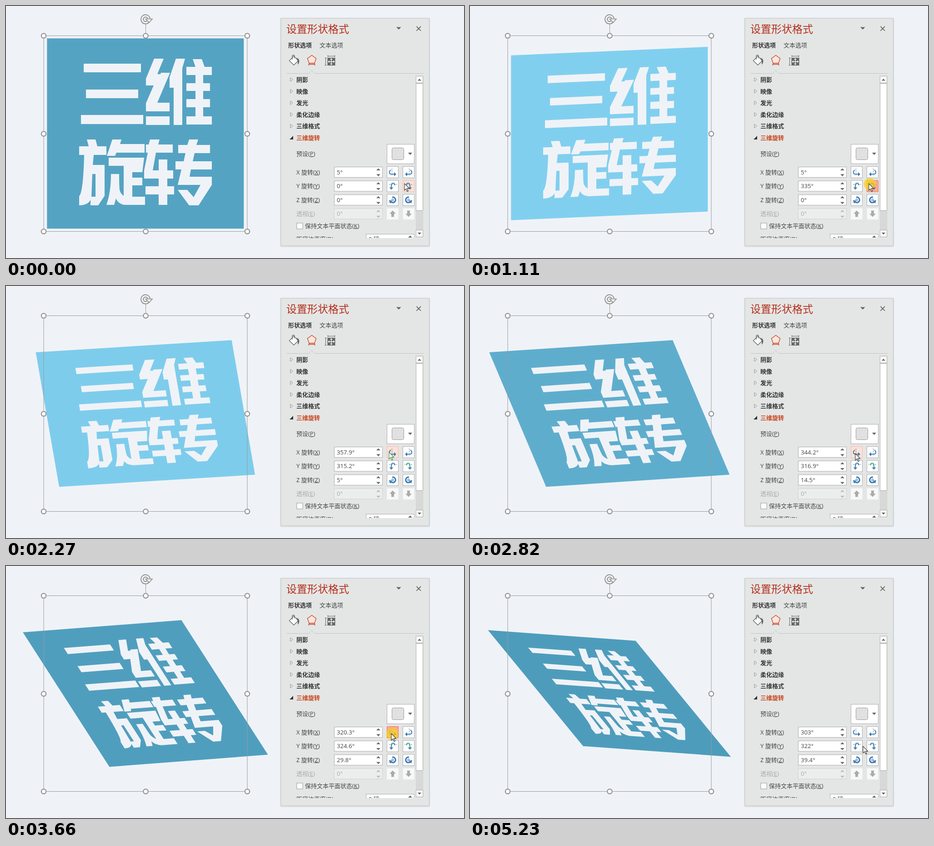
Recreate the animation shown at these times as an HTML page. Size 1008 by 555 pixels, loop 5380 ms.

```html
<!DOCTYPE html>
<html lang="zh-CN">
<head>
<meta charset="utf-8">
<title>三维旋转</title>
<style>
  html, body { margin: 0; width: 100%; height: 100%; overflow: hidden; background: #eff3f7; }
  svg { display: block; width: 100vw; height: 100vh; }
  text { font: 13px "Open Sans", "Noto Sans CJK SC", "Noto Sans CJK", sans-serif; fill: #444; }
  .title { font-size: 23px; fill: #b5301d; }
  .bold { font-weight: 700; fill: #333; }
  .hot { fill: #c8451f; }
  .off { fill: #a9aaaa; }
  .value { font-size: 13.2px; }
  .key { text-decoration: underline; }
  .box { fill: #fff; stroke: #ababab; }
  .tri { fill: #666; }
  .frame { fill: none; stroke: #999; }
  .knob { fill: #fff; stroke: #949494; stroke-width: 2.2; }
  .btn.hover { fill: #fde1d7; stroke: #f2bba8; }
  .btn.down { fill: #ffaa90; stroke: #e5755a; }
  .icon { fill: none; stroke: #3a7db5; stroke-width: 2; }
  .icon .axis { stroke: #777; stroke-width: 1; stroke-dasharray: 3 2; }
  .icon .head { fill: #3a7db5; stroke: none; }
</style>
</head>
<body>
<svg viewBox="0 0 1008 555" preserveAspectRatio="none">
  <defs>
    <clipPath id="list"><rect x="606" y="150" width="296" height="361"/></clipPath>
    <filter id="shade" x="-5%" y="-5%" width="110%" height="110%">
      <feDropShadow dx="0" dy="1" stdDeviation="1.5" flood-color="#000" flood-opacity=".2"/>
    </filter>
    <g id="turnX">
      <path class="axis" d="M-1.500-8V8"/>
      <path d="M-4-5C-9-1-8 5-1 4.500H4"/><path class="head" d="M3 0L8 4.500L3 9Z"/>
    </g>
    <g id="turnY">
      <path class="axis" d="M-8-3.500H9"/>
      <path class="arc" d="M5-2C4-8-3-8-3-1V4"/><path class="head" d="M-7.500 3H1.500L-3 8Z"/>
    </g>
    <g id="turnZ">
      <path d="M-1-6A6 6 0 1 1-4 4" stroke-width="3"/><path class="head" d="M-8 0L-1 2L-6 8Z"/>
      <circle cx="0" cy="0" r="2" stroke-width="1.200"/>
    </g>
  </defs>

  <g id="card" role="img" aria-label="三维旋转">
    <rect id="face" x="90.300" y="71.300" width="433" height="419"/>
    <g fill="#eff3f7">
      <path d="M171 127H297V146H171ZM176 184H291V203H176ZM165 240H302V260H165Z"/>
      <path d="M326 116H347L333 150H340L341 147H361L333 213H360V232H308V214L325 175H308V160ZM308 243H360V262H308Z
        M374 116H394L388 137V262H369V180H360V157ZM397 134H417L411 117H431L437 134H453V152H434V170H449V187H434V205H449V223H434V243H453V261H397V243H417V223H397V205H417V187H397V170H417V152H397Z"/>
      <path d="M178 294H197L201 309H221V328H193L191 350H217V418L203 439H186V420H197V370H190L188 420Q185 439 161 439V419Q170 410 172 328H161V309H182Z
        M234 294H254L251 304H305V323H243L240 330H222Z
        M226 334H304L300 366H278V378H300V395H278V420H306V438H262Q248 437 242 424L238 438H221Q231 410 231 370H249Q249 395 250 405Q253 415 259 418V352H226Z"/>
      <path d="M317 294H338L335 305H367V323H330L323 362H336V338H355V362H368V380H355V397H370V415H355V438H336V415H307V397H336V380H304V362L312 323H308V305H314Z
        M403 294H423L419 306H449V324H415L411 342H453V360H407L404 376H453V394L424 439H403L378 405H399L413 421L428 394H378L386 360H373V342H391L395 324H379V306H399Z"/>
    </g>
  </g>

  <path class="frame" d="M83 65.500H531V496.500H83ZM307.500 39V62"/>
  <g id="knobs"></g>
  <g fill="none">
    <path d="M312.500 34.500A7.500 7.500 0 1 1 314.500 28" stroke="#8f8f8f" stroke-width="7"/>
    <path d="M312.500 34.500A7.500 7.500 0 1 1 314.500 28" stroke="#f4f5f6" stroke-width="3.200"/>
    <path d="M307.500 28.500H322L315 36.500Z" fill="#f4f5f6" stroke="#8f8f8f" stroke-width="1.600"/>
  </g>

  <rect x="605" y="27" width="326.500" height="501" fill="#e4e6e5" stroke="#c2c4c5" filter="url(#shade)"/>
  <text class="title" x="617" y="58.500">设置形状格式</text>
  <path class="tri" d="M859 46.500H869.500L864.200 52Z"/>
  <path d="M903.500 45L913 54.500M913 45L903.500 54.500" stroke="#555" stroke-width="1.600"/>
  <text class="bold" x="621" y="90.500">形状选项</text>
  <text x="690" y="90.500">文本选项</text>

  <g fill="none" stroke="#666" stroke-width="1.300">
    <path d="M623.500 120.500L633.500 110.500L643.500 120.500L633.500 130Z" fill="#fafafa"/>
    <path d="M630 118V109.500Q632.500 107 635 109.500V115"/>
    <path d="M639 114Q646 116 645.500 122Q645 127 642 129Q643 122 639 114Z" fill="#666" stroke="none"/>
    <path d="M673 108.500L682.500 115.500L679 126H667L663.500 115.500Z" fill="#f8e5de" stroke="#c8451f" stroke-width="1.300"/>
    <path d="M667 126.500L666 131M679 126.500L680 131M666 128.500H680" stroke="#c8451f"/>
    <rect x="707.500" y="114" width="17" height="17" fill="#666" stroke="none"/>
    <path d="M716 116.500V128.500M710 122.500H722M714 118L716 116L718 118M714 127L716 129L718 127M711.500 120.500L709.500 122.500L711.500 124.500M720.500 120.500L722.500 122.500L720.500 124.500" stroke="#fff"/>
    <path d="M708 110.500H724M708.500 108V113M723.500 108V113M703.500 114V130M701.500 114.500H706M701.500 130.500H706" stroke-width="1"/>
  </g>
  <path d="M617 148.500H667L673 141.500L679 148.500H919" fill="none" stroke="#c3c5c7"/>

  <g id="panel" clip-path="url(#list)"></g>

  <rect x="902" y="154" width="16.500" height="355" fill="#d7d9d8"/>
  <path class="box" d="M902.500 154.500H917.500V169.500H902.500ZM902.500 170.500H917.500V450.500H902.500ZM902.500 493.500H917.500V508.500H902.500Z"/>
  <path class="tri" d="M906 164.500L910 160L914 164.500ZM906 499L910 503.500L914 499Z"/>

  <circle id="spot" r="13" fill="#f6d21c" opacity=".72"/>
  <path id="cursor" d="M0 0V15L3.500 11.700L6 17.500L8.300 16.500L5.800 10.900H10.600Z" fill="#fff" stroke="#333" stroke-width="1.100"/>
</svg>

<script>
const $ = id => document.getElementById(id);
const LOOP = 5380, RAD = Math.PI / 180, CX = 306.8, CY = 280.8;

// Static parts
const label = (name, key, y, cls = '') =>
  `<text class="${cls}" x="639" y="${y}">${name}(<tspan class="key">${key}</tspan>)</text>`;
const field = (x, y, off) =>
  `<rect class="box" x="${x + .5}" y="${y - 11.5}" width="106" height="23"
    ${off ? 'style="fill:#eceded;stroke:#d0d1d1"' : ''}/>
  <path class="tri" ${off ? 'style="fill:#bbb"' : ''}
    d="M${x + 93} ${y - 4}l4.500-4.500l4.500 4.500ZM${x + 93} ${y + 4.5}l4.500 4.500l4.500-4.500Z"/>`;

const heads = ['阴影', '映像', '发光', '柔化边缘', '三维格式', '三维旋转'].map((name, i) => {
  const y = 162 + i * 25.6, open = i === 5;
  const mark = open
    ? `<path d="M624 ${y + 4}H632V${y - 4}Z" fill="#333"/>`
    : `<path d="M626 ${y - 4}L631 ${y}L626 ${y + 4}Z" fill="#f4f4f4" stroke="#888"/>`;
  return mark + `<text class="bold ${open ? 'hot' : ''}" x="639" y="${y + 5}">${name}</text>`;
});

const rows = ['X', 'Y', 'Z'].map((axis, i) => {
  const y = 366 + i * 30.6;
  const buttons = [838, 873].map((x, side) =>
    `<rect class="box btn" x="${x + .5}" y="${y - 12.5}" width="25" height="25"/>
    <g class="icon" id="icon${axis}${side}" transform="translate(${x + 13} ${y}) scale(${side ? -1 : 1} 1)">
      ${$('turn' + axis).innerHTML}</g>`);
  return label(axis + ' 旋转', axis, y + 4.5) + field(722, y) +
    `<text class="value" id="val${axis}" x="728" y="${y + 4.5}"></text>` + buttons.join('');
});

$('panel').innerHTML = heads.join('') + label('预设', 'P', 330) +
  `<rect class="box" x="838.500" y="304.500" width="60" height="43"/>
  <rect x="849.500" y="312.500" width="26" height="26" rx="3" fill="#e1e1e1" stroke="#999"/>
  <path class="tri" d="M885 323H894L889.500 328Z"/>` +
  rows.join('') +
  label('透视', 'E', 462, 'off') + field(722, 457.5, true) +
  `<text class="value off" x="728" y="462">0°</text>
  <path d="M838.500 445.500H863.500V470H838.500ZM873.500 445.500H898.500V470H873.500Z" fill="#f8f8f8"/>
  <path d="M851 450.500L858 457.500H854V464.500H848V457.500H844ZM886 464.500L893 457.500H889V450.500H883V457.500H879Z" fill="#aaa"/>
  <rect x="640" y="478" width="13" height="13" fill="#fff" stroke="#999"/>
  <text x="658" y="488.500">保持文本平面状态(<tspan class="key">K</tspan>)</text>` +
  label('距底边高度', 'D', 518) + field(792, 514) + '<text x="798" y="518">0 磅</text>';

$('knobs').innerHTML = [83, 307.5, 531].flatMap(x => [65.5, 281.5, 496.5].map(y =>
  x === 307.5 && y === 281.5 ? '' : `<circle class="knob" cx="${x}" cy="${y}" r="5.200"/>`)).join('');

// Screen refresh times: start, end, count
const ticks = [0];
[[90, 620, 8], [710, 1180, 7], [1280, 1350, 2], [1500, 1960, 7], [2060, 2580, 8], [2650, 3120, 7],
 [3190, 3660, 7], [3740, 4270, 8], [4340, 4580, 4], [4750, 4820, 2], [5010, 5230, 4]]
  .forEach(([a, b, n]) => { for (let i = 0; i < n; i++) ticks.push(a + (b - a) * i / (n - 1)); });

// Each entry turns the card by five degrees
const tilt = [240, 390, 540, 710, 870, 1020, 1180, 1350, 1500];
const swing = [2060, 2200, 2430, 2650, 2810, 3040, 3350, 3500, 3740];
const tilt2 = [4580, 4750];
const presses = [160, 320, 470, 620, 790, 950, 1100, 1280, 1960, 2130, 2350, 2580, 2730,
  2960, 3270, 3420, 3660, 4420];
const path = [[0, 877, 391], [1500, 878, 391], [1960, 844, 366], [2290, 843, 366], [2350, 848, 369],
  [3740, 848, 369], [4270, 880, 394], [4950, 880, 394], [5230, 865, 397]];
const light = [[0, 66], [10, 41], [30, 0], [45, -7]];

const SLACK = 15;
const turned = (list, t) => 5 * list.filter(s => s <= t + SLACK).length;

function along(keys, t, k = 1) {
  const i = keys.findIndex(p => p[0] > t);
  if (i < 0) return keys[keys.length - 1][k];
  if (!i) return keys[0][k];
  const a = keys[i - 1], b = keys[i];
  return a[k] + (b[k] - a[k]) * (t - a[0]) / (b[0] - a[0]);
}

const rotX = ([x, y, z], d) => {
  const c = Math.cos(d * RAD), s = Math.sin(d * RAD);
  return [x, y * c - z * s, y * s + z * c];
};
const rotY = ([x, y, z], d) => {
  const c = Math.cos(d * RAD), s = Math.sin(d * RAD);
  return [x * c + z * s, y, z * c - x * s];
};

// Right and down axes of the card
function axes(a, b, c) {
  return [[Math.cos(5 * RAD), 0, Math.sin(5 * RAD)], [0, 1, 0]]
    .map(p => rotX(rotY(rotX(p, a), b), c));
}

function angleText(rad) {
  const d = +(((rad / RAD) % 360 + 360) % 360).toFixed(1);
  return d % 360 + '°';
}

const buttons = [...document.querySelectorAll('.btn')].map(el => ({
  el, x: +el.getAttribute('x'), y: +el.getAttribute('y')
}));

function draw(time) {
  const t = ticks.filter(s => s <= time + SLACK).pop();

  const a = turned(tilt, t), b = turned(swing, t), c = turned(tilt2, t);
  const [u, v] = axes(a, b, c), w = Math.cos(5 * RAD);
  $('card').setAttribute('transform',
    `translate(${CX} ${CY}) matrix(${u[0] / w} ${u[1] / w} ${v[0]} ${v[1]} 0 0) translate(${-CX} ${-CY})`);
  const glow = b ? along(light, b) : a * 1.46;
  $('face').setAttribute('fill', `rgb(${[85, 163, 195].map(n => Math.min(255, Math.round(n + glow)))})`);

  // The numbers trail behind the card
  const [p, q] = axes(turned(tilt, t - 200), turned(swing, t - 200), turned(tilt2, t - 70));
  $('valX').textContent = angleText(Math.atan2(p[2], p[0] * q[1] - p[1] * q[0]));
  $('valY').textContent = angleText(-Math.asin(q[2]));
  $('valZ').textContent = angleText(Math.atan2(q[0], q[1]));

  const x = along(path, t), y = along(path, t, 2);
  const down = presses.some(s => t >= s - SLACK && t < s + 55);
  $('cursor').setAttribute('transform', `translate(${x} ${y})`);
  $('cursor').setAttribute('stroke', t >= 1500 && t < 2330 ? '#2f8a45' : '#333');
  $('spot').setAttribute('transform', `translate(${x + 2} ${y + 1})`);
  $('spot').style.display = down ? '' : 'none';
  for (const { el, x: left, y: top } of buttons) {
    const over = x >= left && x <= left + 25 && y >= top && y <= top + 25;
    el.classList.toggle('hover', over && !down);
    el.classList.toggle('down', over && down);
  }
  $('iconY1').querySelector('.arc').style.stroke = t >= 1500 && t < 4750 ? '#35a98c' : '';
}

const start = performance.now();
function loop() {
  draw((performance.now() - start) % LOOP);
  requestAnimationFrame(loop);
}
loop();
</script>
</body>
</html>
```
